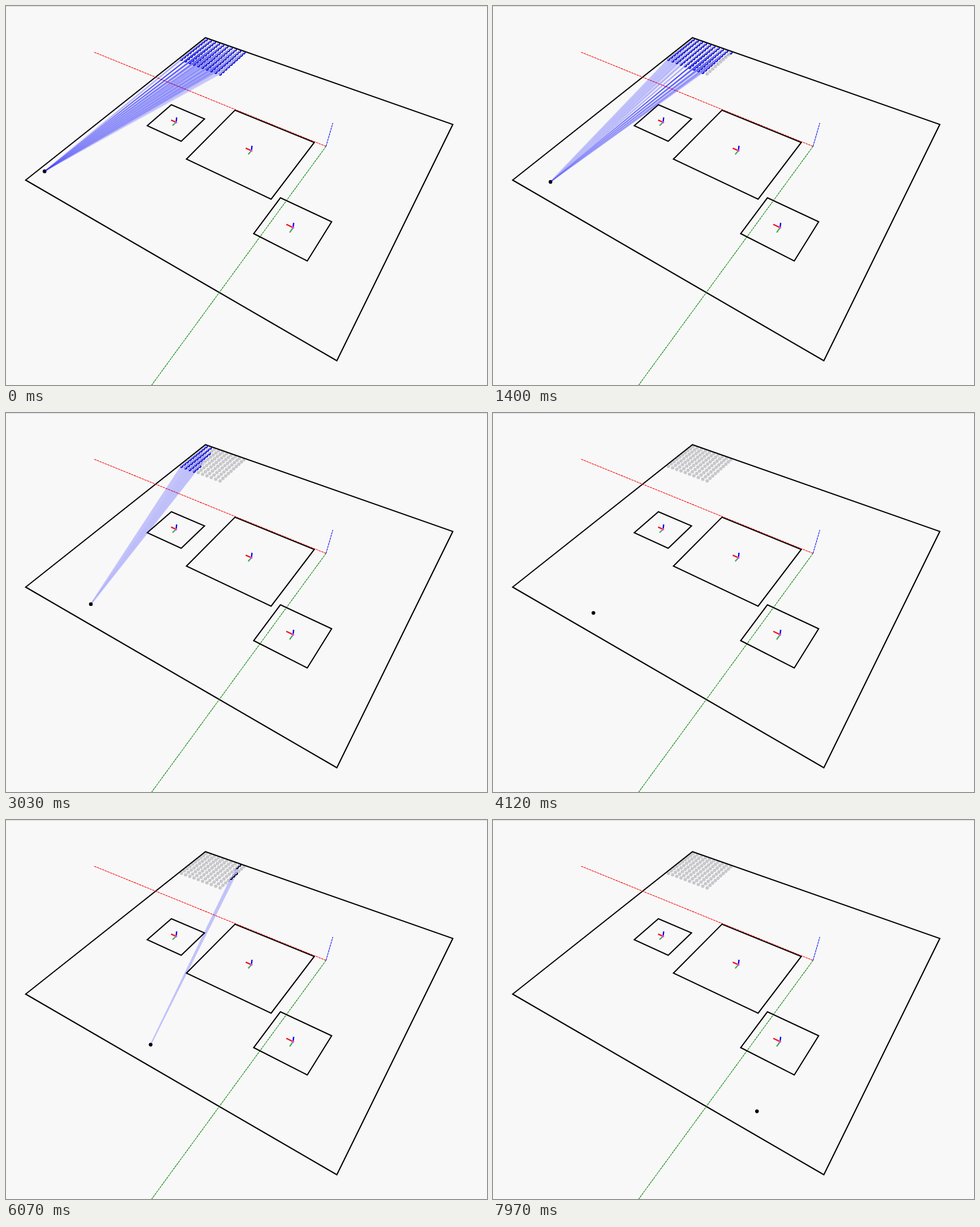
Recreate the animation shown at these times as an HTML page with a canvas. Size 844x664 px, loop 8000 ms.

```html
<!DOCTYPE html>
<html>
<head>
<meta charset="utf-8">
<style>
html, body { margin: 0; width: 100%; height: 100%; overflow: hidden; background: #f8f8f8; }
canvas { display: block; }
</style>
</head>
<body>
<canvas id="stage" width="844" height="664"></canvas>
<script>
const ctx = document.getElementById('stage').getContext('2d');
const LOOP = 8000, TICK = 109, STEP = 0.01;

// The floor is the unit square; obstacles are squares on it
const obstacles = [
  { u: 0.218, v: 0.52, half: 0.07 },
  { u: 0.5, v: 0.5, half: 0.15 },
  { u: 0.75, v: 0.71, half: 0.08 }
];
const goals = Array.from({ length: 100 }, (_, i) =>
  [0.01 + 0.02 * Math.floor(i / 10), 0.01 + 0.02 * (i % 10)]);
// Time and number of steps walked
const walk = [[0, 0], [1400, 8], [1610, 11], [3030, 19], [4120, 25], [4880, 34],
  [6070, 41], [6410, 42], [6730, 45], [7640, 74], [7970, 78]];

// Perspective view of a floor point
function project([u, v]) {
  const w = 1 - 0.18719 * u - 0.2749 * v;
  return [(287.34 * u - 324.85 * v + 349.5) / w, (113.25 * u + 165.79 * v + 55) / w];
}

function viewerAt(t) {
  const i = walk.findIndex(([time]) => time > t);
  let steps = walk[walk.length - 1][1];
  if (i > 0) {
    const [t0, n0] = walk[i - 1], [t1, n1] = walk[i];
    const ticks = Math.round((t1 - t0) / TICK);
    const done = Math.floor((t - t0) / (t1 - t0) * ticks) / ticks;
    steps = Math.floor(n0 + (n1 - n0) * done + 1e-6);
  }
  return [0.02 + STEP * steps, 0.941];
}

// Slab test of the segment a-b against one square
function blocks({ u, v, half }, a, b) {
  let near = 0, far = 1;
  [u, v].forEach((mid, k) => {
    const d = b[k] - a[k] || 1e-9;
    const s = (mid - half - a[k]) / d, e = (mid + half - a[k]) / d;
    near = Math.max(near, Math.min(s, e));
    far = Math.min(far, Math.max(s, e));
  });
  return near < far;
}

function trace(points) {
  points.forEach((p, i) => i ? ctx.lineTo(...p) : ctx.moveTo(...p));
}
function line(points, color, width, closed) {
  ctx.beginPath();
  trace(points);
  if (closed) ctx.closePath();
  ctx.strokeStyle = color;
  ctx.lineWidth = width;
  ctx.stroke();
}
function square(u, v, half) {
  const corners = [[-1, -1], [1, -1], [1, 1], [-1, 1]];
  line(corners.map(([x, y]) => project([u + x * half, v + y * half])), '#000', 2.1, true);
}
function disc([x, y], r, color) {
  ctx.beginPath();
  ctx.arc(x, y, r, 0, 7);
  ctx.fillStyle = color;
  ctx.fill();
}
function axes(u, v, size, up, width, colors) {
  const center = project([u, v]);
  const tips = [project([u - size, v]), project([u, v + size]),
    [center[0] + up[0], center[1] + up[1]]];
  tips.forEach((tip, i) => line([center, tip], colors[i], width));
  return center;
}

function drawScene() {
  for (const g of goals) disc(project(g), 3, '#c8c8cc');
  square(0.5, 0.5, 0.5);
  ctx.setLineDash([4, 1]);
  axes(0.6895, 0.346, 1, [12, -41], 1.1, ['#f00', '#008000', '#00f']);
  ctx.setLineDash([]);
  for (const { u, v, half } of obstacles) {
    square(u, v, half);
    const center = axes(u, v, 0.021, [1, -8.5], 2.3, ['#f01020', '#44aa55', '#0000f0']);
    disc(center, 2, '#e050d0');
  }
}

function drawRays(eye) {
  const from = project(eye);
  const seen = goals.filter(g => !obstacles.some(o => blocks(o, eye, g)));
  const fade = (near, far) => {
    const ramp = ctx.createRadialGradient(...from, 0, ...from, 330);
    ramp.addColorStop(0, `rgba(0,0,255,${near})`);
    ramp.addColorStop(1, `rgba(0,0,255,${far})`);
    return ramp;
  };
  const faint = fade(0.004, 0.015), strong = fade(0.015, 0.13);

  // Columns left of the viewer share one flat tint, the others add up ray by ray
  ctx.beginPath();
  for (const g of seen) if (g[0] < eye[0]) trace([from, project(g)]);
  ctx.strokeStyle = 'rgba(0,0,255,.2)';
  ctx.lineWidth = 2.4;
  ctx.stroke();
  for (const g of seen) line([from, project(g)], g[0] < eye[0] ? faint : strong, 2);

  const tip = eye[0] > 0.35 ? '#000020' : '#0000e4';
  for (const g of seen) {
    ctx.beginPath();
    ctx.arc(...project(g), 2.2, -0.7, 2.3);
    ctx.strokeStyle = tip;
    ctx.lineWidth = 1.7;
    ctx.stroke();
  }
}

function frame(now) {
  const eye = viewerAt(now % LOOP);
  ctx.setTransform(1, 0, 0, 1, 0, 0);
  ctx.fillStyle = '#f8f8f8';
  ctx.fillRect(0, 0, 844, 664);
  ctx.fillStyle = '#d4d4d4';
  ctx.fillRect(0, 0, 844, 1);
  ctx.translate(0.5, 0.5);
  drawScene();
  disc(project(eye), 3.1, '#000');
  drawRays(eye);
  ctx.beginPath();
  ctx.arc(...project(eye), 2.4, 0, 7);
  ctx.strokeStyle = '#000';
  ctx.lineWidth = 1.4;
  ctx.stroke();
  requestAnimationFrame(frame);
}
frame(0);
</script>
</body>
</html>
```
